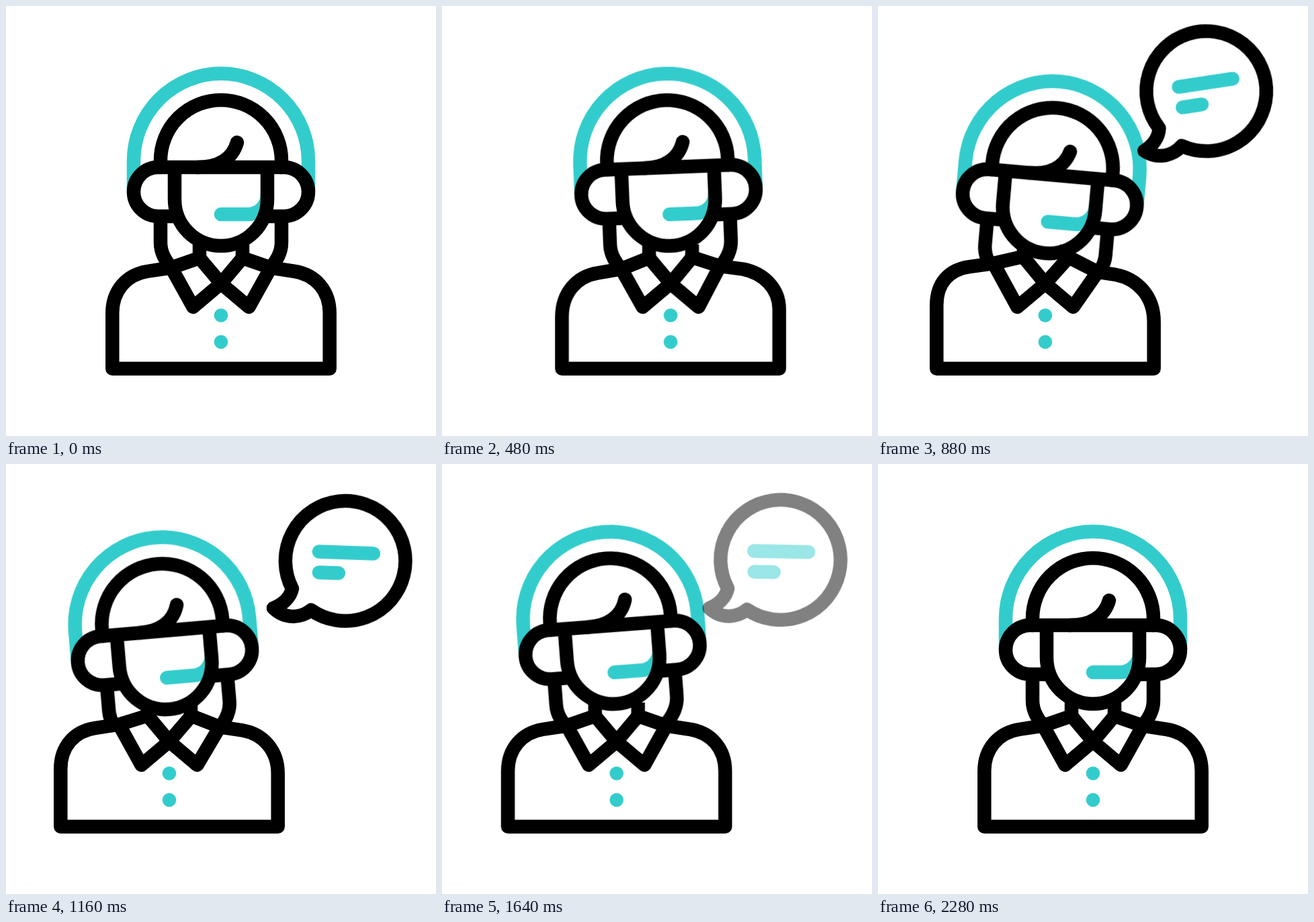
Recreate the animation shown at these times as an HTML page. Size 640 px wide and 640 px high, loop 3 s.

```html
<!DOCTYPE html>
<html lang="en">
<head>
<meta charset="utf-8">
<title>Support agent</title>
<style>
html, body { margin: 0; height: 100%; overflow: hidden; background: #fff; }
svg { display: block; width: 100vw; height: 100vh; }
path { fill: none; stroke: #000; stroke-width: 20.5; stroke-linecap: round; stroke-linejoin: round; }
.teal { stroke: #3cc; }
.butt { stroke-linecap: butt; }
circle { fill: #3cc; }

.sway, .nod, .tilt, .torso, .fade, .pop, .rock {
  animation: 3s cubic-bezier(.333, 0, .667, 1) infinite;
}
.sway { animation-name: sway; }
.nod { animation-name: nod; }
.tilt { animation-name: tilt; transform-origin: 320px 353px; }
.torso { animation-name: torso; fill: #fff; }
.fade { animation-name: fade; }
.pop { animation-name: pop; transform-origin: 403px 224px; }
.rock { animation-name: rock; transform-origin: 403px 224px; }

@keyframes sway {
  0%, 73.33%, 100% { transform: translateX(0); }
  13.33% { transform: translateX(26px); }
  32.1%, 46.67% { transform: translateX(-77px); }
}
@keyframes nod {
  0%, 15.5%, 51.1%, 100% { transform: translateY(0); }
  30%, 32.2% { transform: translateY(11px); }
}
@keyframes tilt {
  0%, 67.8%, 100% { transform: rotate(0deg); }
  13.33% { transform: rotate(-2.8deg); }
  30% { transform: rotate(5.1deg); }
  38.9%, 51.1% { transform: rotate(-4.9deg); }
}
/* shoulders lean while the hem and collar tips stay put */
@keyframes torso {
  0%, 43.3%, 100% {
    d: path("M158.3 539.8 V457 C158.3 424 179 400 210 395 L246 389.5 L278.5 448 L320 413 L361.5 448 L394 389.5 L430 395 C461 400 481.7 424 481.7 457 V539.8 Z M246 389.5 L288 375 L320 413 L278.5 448 Z M394 389.5 L352 375 L320 413 L361.5 448 Z");
  }
  13.33% {
    d: path("M158.3 539.8 V464 C158.3 429 180 403 212 398 L247 392 L278.5 448 L320 413 L361.5 448 L393 386.5 L428 391 C459 397 481.7 420 481.7 450 V539.8 Z M247 392 L288 375 L320 413 L278.5 448 Z M393 386.5 L352 374 L320 413 L361.5 448 Z");
  }
  30% {
    d: path("M158.3 539.8 V445 C158.3 412 177 392 207 388 L243 383 L278.5 448 L320 413 L361.5 448 L398 396 L425 400 C457 406 481.7 432 481.7 470 V539.8 Z M243 383 L287 373 L320 413 L278.5 448 Z M398 396 L355 374 L320 413 L361.5 448 Z");
  }
}
@keyframes fade {
  0%, 42% { opacity: 1; }
  67.33%, 100% { opacity: 0; }
}
@keyframes pop {
  0%, 18.9% { transform: scale(0); }
  25.56%, 100% { transform: scale(1); }
}
@keyframes rock {
  0%, 18.9%, 56.67%, 100% { transform: rotate(0deg); }
  25.56%, 36.67%, 47.78% { transform: rotate(9deg); }
  31.11%, 42.22% { transform: rotate(-14deg); }
}
</style>
</head>
<body>
<svg viewBox="0 0 640 640">
  <g class="sway">
    <path class="butt" d="M288 355 V377 M352 355 V377"/>
    <g class="nod"><g class="tilt">
      <path class="teal butt" d="M190 276 V230.6 A130 130 0 0 1 450 230.6 V276"/>
      <path class="teal" d="M320 310 H360 A29 29 0 0 0 389 281"/>
      <path d="M230 240 V230 A90 90 0 0 1 410 230 V240"/>
      <path d="M344 203 C337 228 315 240 285 240"/>
      <path class="butt" d="M250 313 H226.5 A36.5 36.5 0 0 1 226.5 240 H413.5 A36.5 36.5 0 0 1 413.5 313 H390"/>
      <path class="butt" d="M251 240 V288 A69 69 0 0 0 389 288 V240"/>
      <path class="butt" d="M230 318 V352 Q230 374 251 394 M410 318 V352 Q410 374 389 394"/>
    </g></g>
    <path class="torso" d="M158.3 539.8 V457 C158.3 424 179 400 210 395 L246 389.5 L278.5 448 L320 413 L361.5 448 L394 389.5 L430 395 C461 400 481.7 424 481.7 457 V539.8 Z M246 389.5 L288 375 L320 413 L278.5 448 Z M394 389.5 L352 375 L320 413 L361.5 448 Z"/>
    <circle cx="320" cy="460.5" r="10.3"/>
    <circle cx="320" cy="500" r="10.3"/>
  </g>
  <g class="fade"><g class="pop"><g class="rock">
    <g transform="rotate(-2.1 403 224)">
      <path d="M426 185.5 A89.3 89.3 0 1 1 454 217.5 C438 230 415 231 398 214.5 C412 209 423 199 426 185.5 Z"/>
      <path class="teal" d="M466 130.5 L547 133.5 M466 161.5 L495 162.5"/>
    </g>
  </g></g></g>
</svg>
</body>
</html>
```
